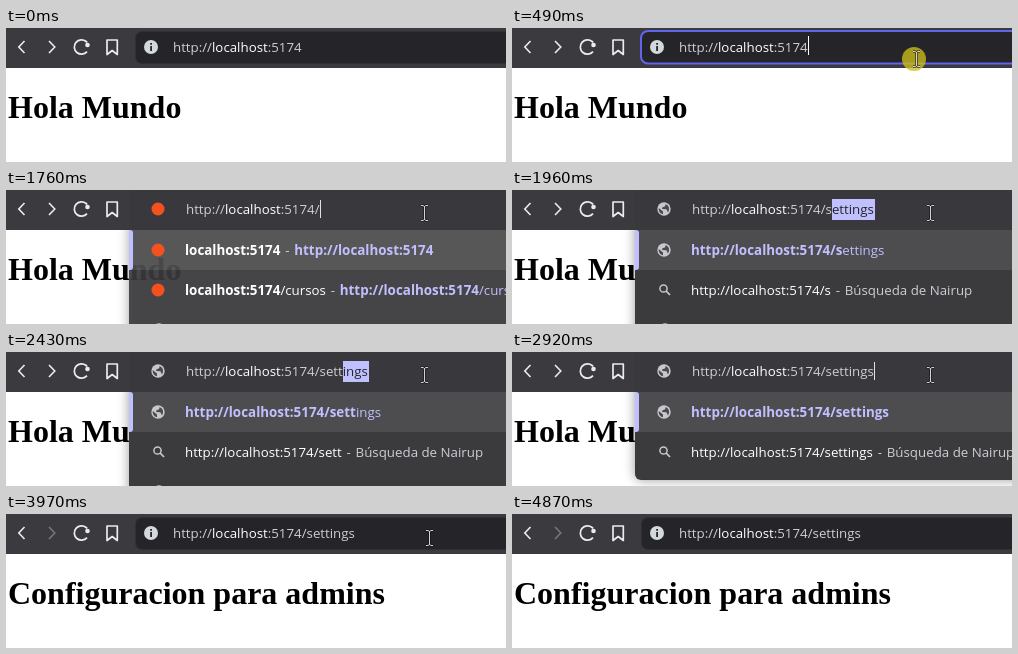
Recreate the animation shown at these times as an HTML page with a canvas. Size 500 by 134 pixels, loop 5530 ms.

```html
<!DOCTYPE html>
<html lang="es">
<head>
<meta charset="utf-8">
<title>Hola Mundo</title>
<style>
  html, body { margin: 0; width: 500px; height: 134px; overflow: hidden; background: #fff; }
  canvas { display: block; }
</style>
</head>
<body>
<canvas id="stage" width="500" height="134"></canvas>
<script>
const c = document.getElementById('stage').getContext('2d');
const LOOP = 5530;
const UI = '13.3px "Open Sans", sans-serif';
const BOLD = 'bold 13.4px "Open Sans", sans-serif';
const TOOLBAR = '#3b3b3f', FIELD = '#242429', ICON = '#ececee';
const WHITE = '#fff', DIM = '#cdcfd6', LILAC = '#c1c0ff', ORANGE = '#f4511e';
const PATH = '/settings';
const DASH = ' \u200a-\u200a ';
// When each character of PATH appears
const KEYS = [1760, 1900, 2030, 2230, 2430, 2500, 2580, 2720, 2920];
const SUBMIT = 3380, LOADED = 3580;
// Pointer waypoints: time, x, y
const ROUTE = [
  [70, 490, 104], [420, 409, 36], [490, 404, 31], [560, 404, 31], [770, 418, 23],
  [3839, 418, 23], [3840, 420, 24], [3969, 420, 24], [3970, 423, 24],
  [4170, 423, 24], [4310, 426, 34], [4730, 455, 112], [4800, 459, 122]
];

const within = (t, a, b) => t >= a && t < b;

function box(x, y, w, h, r, color) {
  c.fillStyle = color;
  c.beginPath();
  c.roundRect(x, y, w, h, r);
  c.fill();
}

function disc(x, y, r, color) {
  c.fillStyle = color;
  c.beginPath();
  c.arc(x, y, r, 0, 7);
  c.fill();
}

function line(points, color = ICON, width = 1.6, close = false) {
  c.strokeStyle = color;
  c.lineWidth = width;
  c.beginPath();
  points.forEach(([x, y]) => c.lineTo(x, y));
  if (close) c.closePath();
  c.stroke();
}

// Draws [text, color, bold] pieces in a row and returns the end x
function runs(x, y, pieces) {
  for (const [text, color, bold] of pieces) {
    c.font = bold ? BOLD : UI;
    c.fillStyle = color;
    c.fillText(text, x, y);
    x += c.measureText(text).width;
  }
  return x;
}

const url = path => [['http://', DIM], ['localhost', WHITE], [':5174' + path, DIM]];

function toolbar(t) {
  const loading = within(t, SUBMIT, LOADED);
  box(0, 0, 500, 40, 0, TOOLBAR);
  line([[18.5, 13], [12.8, 19], [18.5, 25]]);
  line([[43, 13], [48.8, 19], [43, 25]], t >= LOADED ? '#77777b' : ICON);
  if (loading) {
    line([[71, 14], [81, 24]], ICON, 1.8);
    line([[81, 14], [71, 24]], ICON, 1.8);
  } else {
    c.strokeStyle = ICON;
    c.lineWidth = 1.7;
    c.beginPath();
    c.arc(75.5, 19, 7.2, 0.7, 5.6);
    c.stroke();
    disc(81.5, 17, 2.3, ICON);
  }
  c.lineJoin = 'round';
  line([[101, 12], [111.3, 12], [111.3, 26.5], [106.2, 22.5], [101, 26.5]], ICON, 1.7, true);
  c.lineJoin = 'miter';
}

function addressBar(t) {
  const focused = within(t, 490, KEYS[0]);
  const selected = within(t, 560, 900);
  const caret = within(t, 490, 560) || within(t, 900, 1500);
  box(129, 3, 400, 33, 7, '#303034');
  box(130, 4, 400, 31, 6, FIELD);
  if (focused) {
    c.strokeStyle = '#6165ee';
    c.lineWidth = 2;
    c.beginPath();
    c.roundRect(129, 3, 400, 32.5, 7);
    c.stroke();
  }
  disc(145, 19, 7, '#d3d8dc');
  box(144.2, 18, 1.8, 5, 0, FIELD);
  box(144.2, 15, 1.8, 1.8, 0, FIELD);
  if (selected) {
    box(167, 9, 129, 21, 0, LILAC);
    runs(167, 24, [['http://localhost:5174', FIELD]]);
  } else {
    runs(167, 24, url(t >= SUBMIT ? PATH : ''));
  }
  if (caret) box(296, 8, 1, 19, 0, WHITE);
}

function globe(x, y) {
  disc(x, y, 6.7, '#c6c8cc');
  c.fillStyle = '#4a4a4e';
  c.beginPath();
  c.moveTo(x - 5.3, y - 1);
  c.lineTo(x - 1, y + 2.6);
  c.lineTo(x - 1, y + 5.3);
  c.quadraticCurveTo(x - 5.8, y + 4, x - 5.3, y - 1);
  c.moveTo(x + 1.6, y - 5);
  c.lineTo(x + 1.2, y - 2.8);
  c.lineTo(x - 1.8, y - 1.6);
  c.lineTo(x - 1.8, y);
  c.lineTo(x + 2.4, y + 0.2);
  c.lineTo(x + 4, y + 3.4);
  c.quadraticCurveTo(x + 7, y - 2.5, x + 1.6, y - 5);
  c.fill();
}

function magnifier(x, y) {
  c.strokeStyle = '#c6c8cc';
  c.lineWidth = 1.5;
  c.beginPath();
  c.arc(x - 1.5, y - 1.5, 3.6, 0, 7);
  c.stroke();
  line([[x + 1.2, y + 1.2], [x + 5, y + 5]], '#c6c8cc', 1.7);
}

function popup(t, typed) {
  const bottom = typed === PATH ? 128 : 150;
  // Only the panel is see-through while it opens and closes
  c.save();
  c.globalAlpha = t < 1830 || t >= SUBMIT ? 0.9 : 1;
  c.shadowColor = 'rgba(0,0,0,.4)';
  c.shadowBlur = 12;
  c.beginPath();
  c.rect(0, 40, 500, 94);
  c.clip();
  box(123, 30, 400, bottom - 30, 6, '#3b3b3e');
  c.restore();
  box(123, 40, 377, 40, 0, 'rgba(255,255,255,.095)');
  box(123, 40, 4, 40, [0, 3, 3, 0], LILAC);

  if (typed === '/') {
    const link = ['http://localhost:5174', LILAC, true];
    const host = ['localhost:5174', WHITE, true];
    disc(152, 60, 6.5, ORANGE);
    disc(152, 100, 6.5, ORANGE);
    runs(179, 65, [host, [DASH, DIM], link]);
    runs(179, 105, [host, ['/cursos', WHITE], [DASH, DIM], link, ['/cursos', LILAC]]);
  } else {
    globe(152, 60);
    magnifier(153, 100);
    runs(179, 65, [
      ['http://localhost:5174' + typed, LILAC, true],
      [PATH.slice(typed.length), LILAC]
    ]);
    runs(179, 105, [['http://localhost:5174' + typed, WHITE], [DASH + 'Búsqueda de Nairup', DIM]]);
  }
  if (bottom > 134) globe(153, 140);
}

function editField(typed) {
  const rest = typed === '/' ? '' : PATH.slice(typed.length);
  box(123, 0, 377, 40, 0, '#39393d');
  if (typed === '/') disc(152, 19, 6.5, ORANGE);
  else globe(152, 19);
  const end = runs(180, 24, url(typed));
  if (rest) {
    box(Math.round(end), 9, Math.ceil(c.measureText(rest).width), 21, 0, LILAC);
    runs(end, 24, [[rest, FIELD]]);
  } else {
    box(Math.round(end), 10, 1, 18, 0, '#e0e0e2');
  }
}

function pointerAt(t) {
  const i = ROUTE.findIndex(p => p[0] > t);
  if (i < 0) return ROUTE.at(-1).slice(1);
  const [t0, x0, y0] = ROUTE[i - 1], [t1, x1, y1] = ROUTE[i];
  const k = (t - t0) / (t1 - t0);
  return [x0 + (x1 - x0) * k, y0 + (y1 - y0) * k].map(Math.round);
}

function pointer(t) {
  if (!within(t, 70, 4870)) return;
  // Moves in 70 ms steps
  const lag = t < 3600 ? t % 70 : t >= 4240 ? (t - 40) % 70 : 0;
  const [x, y] = pointerAt(t - lag);
  if (within(t, 490, 560) || within(t, 900, 1030)) disc(x - 2, y, 12, 'rgba(205,190,25,.78)');
  if (y < 38) {
    const beam = [[-3, -7.5], [-1, -7.5], [0.5, -6.5], [2, -7.5], [4, -7.5]];
    const flip = beam.map(([a, b]) => [x + a, y - b]);
    const top = beam.map(([a, b]) => [x + a, y + b]);
    for (const [color, width] of [['rgba(20,20,24,.7)', 2.6], ['#d2d2d4', 1]]) {
      line(top, color, width);
      line(flip, color, width);
      line([[x + 0.5, y - 7], [x + 0.5, y + 7]], color, width);
    }
  } else {
    const arrow = [[0, 0], [0, 16], [3.7, 12.6], [6.2, 18.2], [8.6, 17.2], [6.2, 11.6], [11.3, 11.4]]
      .map(([a, b]) => [x + 0.5 + a, y + 0.5 + b]);
    line(arrow, '#000', 1, true);
    c.fillStyle = WHITE;
    c.fill();
    line(arrow, '#000', 1, true);
  }
}

function draw(t) {
  const typed = PATH.slice(0, KEYS.filter(k => k <= t).length);
  box(0, 0, 500, 134, 0, WHITE);
  c.font = 'bold 32px "Liberation Serif", serif';
  c.fillStyle = '#000';
  c.fillText(t < LOADED ? 'Hola Mundo' : 'Configuracion para admins', 2, 90);
  toolbar(t);
  addressBar(t);
  if (within(t, KEYS[0], 3450)) popup(t, typed);
  if (within(t, KEYS[0], SUBMIT)) editField(typed);
  pointer(t);
}

const start = performance.now();
function tick() {
  draw((performance.now() - start) % LOOP);
  requestAnimationFrame(tick);
}
tick();
</script>
</body>
</html>
```
